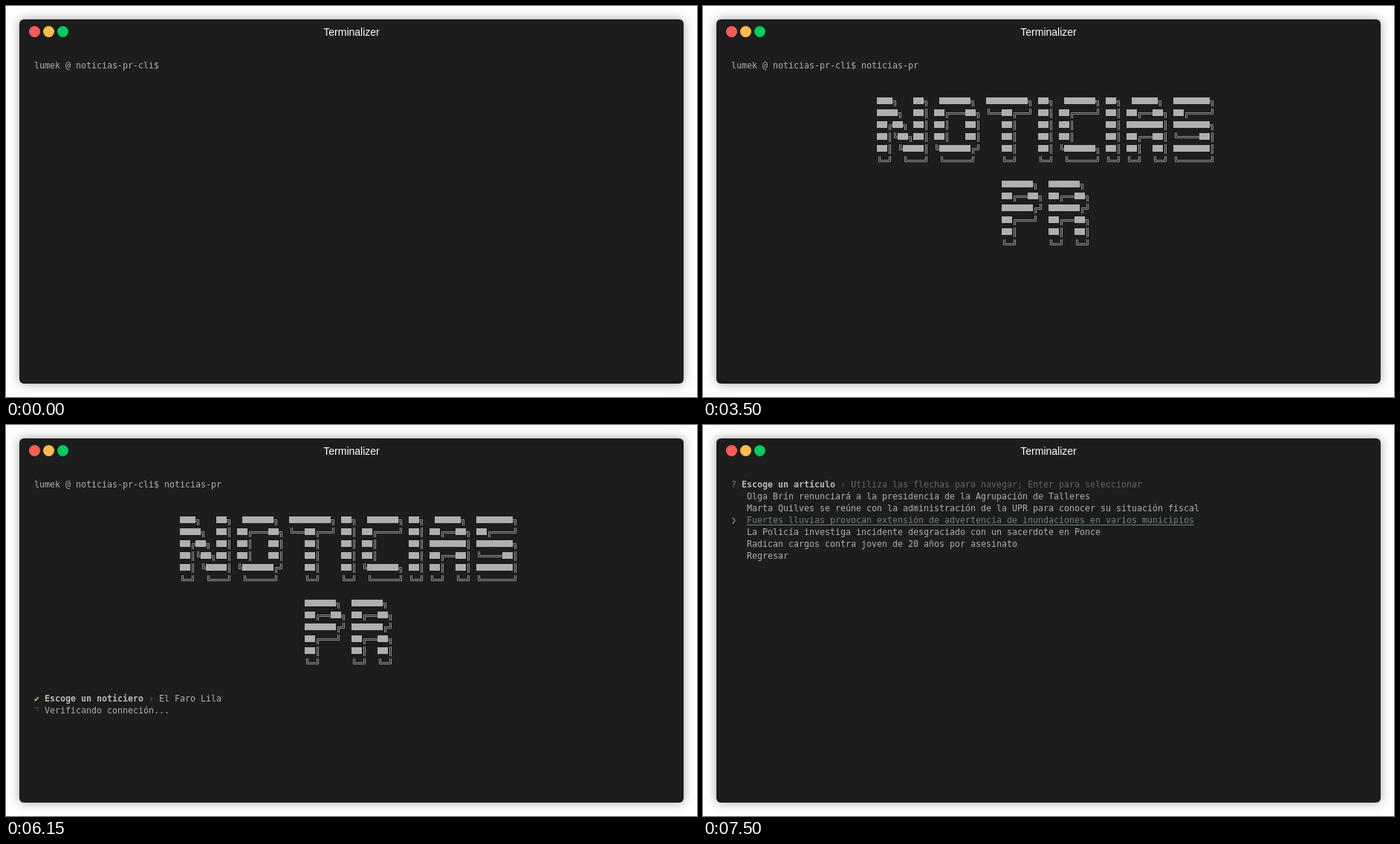
An HTML page for the animation above (8000 ms loop, 930 by 526 pixels).

```html
<!DOCTYPE html>
<html lang="es">
<head>
<meta charset="utf-8">
<title>Terminal</title>
<style>
  html, body { margin: 0; width: 100%; height: 100%; overflow: hidden; background: #fff; }
  svg { display: block; width: 100%; height: 100%; }
  .window { fill: #1d1d1d; filter: drop-shadow(0 0 7px rgba(0, 0, 0, .36)); }
  .title { font: 14px "Liberation Sans", Arial, sans-serif; fill: #fff; text-anchor: middle; }
  #screen text { font: 11.63px "DejaVu Sans Mono", monospace; white-space: pre; fill: #afafaf; }
  #screen .bold { font-weight: bold; fill: #b8b8b8; }
  #screen .dim { fill: #626566; }
  #screen .cyan { fill: #708387; }
  #screen .tick { fill: #e3c650; }
</style>
</head>
<body>
<svg viewBox="0 0 930 526">
  <rect class="window" x="18" y="18" width="894" height="490" rx="6"/>
  <circle cx="38.5" cy="34.5" r="7.5" fill="#ff5c59"/>
  <circle cx="57.5" cy="34.5" r="7.5" fill="#ffbc50"/>
  <circle cx="76.5" cy="34.5" r="7.5" fill="#00ca5f"/>
  <text class="title" x="465" y="40">Terminalizer</text>
  <g id="screen"></g>
</svg>
<script>
const LOOP = 8000;
const CELL = 7, LINE = 16, LEFT = 38, TOP = 80;
const screenGroup = document.getElementById("screen");

const COMMAND = "noticias-pr";
const KEY_TIMES = [410, 630, 730, 890, 1290, 1430, 1570, 1640, 1810, 2000, 2110];
const SPINNER = "⠋⠙⠹⠸⠼⠴⠦⠧⠇⠏";
const HINT = "Utiliza las flechas para navegar; Enter para seleccionar";
const SOURCES = ["El Faro Lila", "Segunda Nota", "Avisuno", "Salir"];
const ARTICLES = [
  "Olga Brín renunciará a la presidencia de la Agrupación de Talleres",
  "Marta Quilves se reúne con la administración de la UPR para conocer su situación fiscal",
  "Fuertes lluvias provocan extensión de advertencia de inundaciones en varios municipios",
  "La Policía investiga incidente desgraciado con un sacerdote en Ponce",
  "Radican cargos contra joven de 20 años por asesinato",
  "Regresar"
];

const LETTERS = {
  N: "███╗   ██╗|████╗  ██║|██╔██╗ ██║|██║╚██╗██║|██║ ╚████║|╚═╝  ╚═══╝",
  O: " ██████╗ |██╔═══██╗|██║   ██║|██║   ██║|╚██████╔╝| ╚═════╝ ",
  T: "████████╗|╚══██╔══╝|   ██║   |   ██║   |   ██║   |   ╚═╝   ",
  I: "██╗|██║|██║|██║|██║|╚═╝",
  C: " ██████╗|██╔════╝|██║     |██║     |╚██████╗| ╚═════╝",
  A: " █████╗ |██╔══██╗|███████║|██╔══██║|██║  ██║|╚═╝  ╚═╝",
  S: "███████╗|██╔════╝|███████╗|╚════██║|███████║|╚══════╝",
  P: "██████╗ |██╔══██╗|██████╔╝|██╔═══╝ |██║     |╚═╝     ",
  R: "██████╗ |██╔══██╗|██████╔╝|██╔══██╗|██║  ██║|╚═╝  ╚═╝"
};

// Line strokes of each box character, relative to the cell's left and middle.
const STROKES = {
  "═": "M0-.5H7M0 1.5H7",
  "║": "M2.5-6V7M4.5-6V7",
  "╔": "M7-.5H2.5V7M7 1.5H4.5V7",
  "╗": "M0-.5H4.5V7M0 1.5H2.5V7",
  "╚": "M2.5-6V1.5H7M4.5-6V-.5H7",
  "╝": "M4.5-6V1.5H0M2.5-6V-.5H0"
};

const colX = col => LEFT + col * CELL;
const rowY = row => TOP + row * LINE;

function text(col, row, content, style = "") {
  return `<text class="${style}" x="${colX(col)}" y="${rowY(row) + 4}">${content}</text>`;
}

function bannerWord(word, col, row) {
  let out = "";
  for (const letter of word) {
    const lines = LETTERS[letter].split("|");
    lines.forEach((line, r) => [...line].forEach((ch, c) => {
      const x = colX(col + c), y = rowY(row + r);
      if (ch === "█") out += `<rect x="${x}" y="${y - 5}" width="7" height="9" fill="#afafaf"/>`;
      else if (STROKES[ch]) {
        out += `<path d="${STROKES[ch]}" transform="translate(${x} ${y})" fill="none" stroke="#929292"/>`;
      }
    }));
    col += lines[0].length + 1;
  }
  return out;
}

const BANNER = bannerWord("NOTICIAS", 28, 3) + bannerWord("PR", 52, 10);

function question(row, label, answer, done) {
  const end = label.length + 3;
  return text(0, row, done ? "✔" : "?", done ? "tick" : "cyan") +
    text(2, row, label, "bold") +
    text(end, row, "›", "dim") +
    text(end + 2, row, answer, done ? "" : "dim");
}

function menu(row, label, options, selected) {
  const items = options.map((option, i) => {
    const r = row + 1 + i;
    if (i !== selected) return text(3, r, option);
    return text(0, r, "❯", "cyan") + text(3, r, option, "cyan") +
      `<rect class="cyan" x="${colX(3)}" y="${rowY(r) + 6}" width="${option.length * CELL}" height="1"/>`;
  });
  return question(row, label, HINT, false) + items.join("");
}

function spinner(row, step) {
  const bits = SPINNER.charCodeAt(step % SPINNER.length) - 0x2800;
  let out = "";
  for (let i = 0; i < 6; i++) {
    if (!(bits >> i & 1)) continue;
    const x = colX(0) + (i < 3 ? 2.2 : 5.2), y = rowY(row) - 3.5 + (i % 3) * 3.5;
    out += `<circle class="cyan" cx="${x}" cy="${y}" r=".8"/>`;
  }
  return out;
}

function spinnerStep(t) {
  return t < 6070 ? Math.min(9, Math.floor((t - 5210) / 79)) : 10 + Math.floor((t - 6070) / 80);
}

function frameMarkup(t) {
  if (t >= 6390) {
    return menu(0, "Escoge un artículo", ARTICLES, t < 7270 ? 0 : t < 7500 ? 1 : 2);
  }
  const typed = KEY_TIMES.filter(time => t >= time).length;
  let out = text(0, 0, "lumek @ noticias-pr-cli$ " + COMMAND.slice(0, typed));
  if (t >= 3500) out += BANNER;
  if (t >= 5210) {
    out += question(18, "Escoge un noticiero", SOURCES[0], true) +
      spinner(19, spinnerStep(t)) + text(2, 19, "Verificando conneción...");
  } else if (t >= 3600) {
    out += menu(18, "Escoge un noticiero", SOURCES, t >= 4410 && t < 5010 ? 1 : 0);
  }
  return out;
}

let shown = null;
function render(t) {
  const markup = frameMarkup(t);
  if (markup !== shown) screenGroup.innerHTML = shown = markup;
}

const start = performance.now();
function tick() {
  render((performance.now() - start) % LOOP);
  requestAnimationFrame(tick);
}
tick();
</script>
</body>
</html>
```
